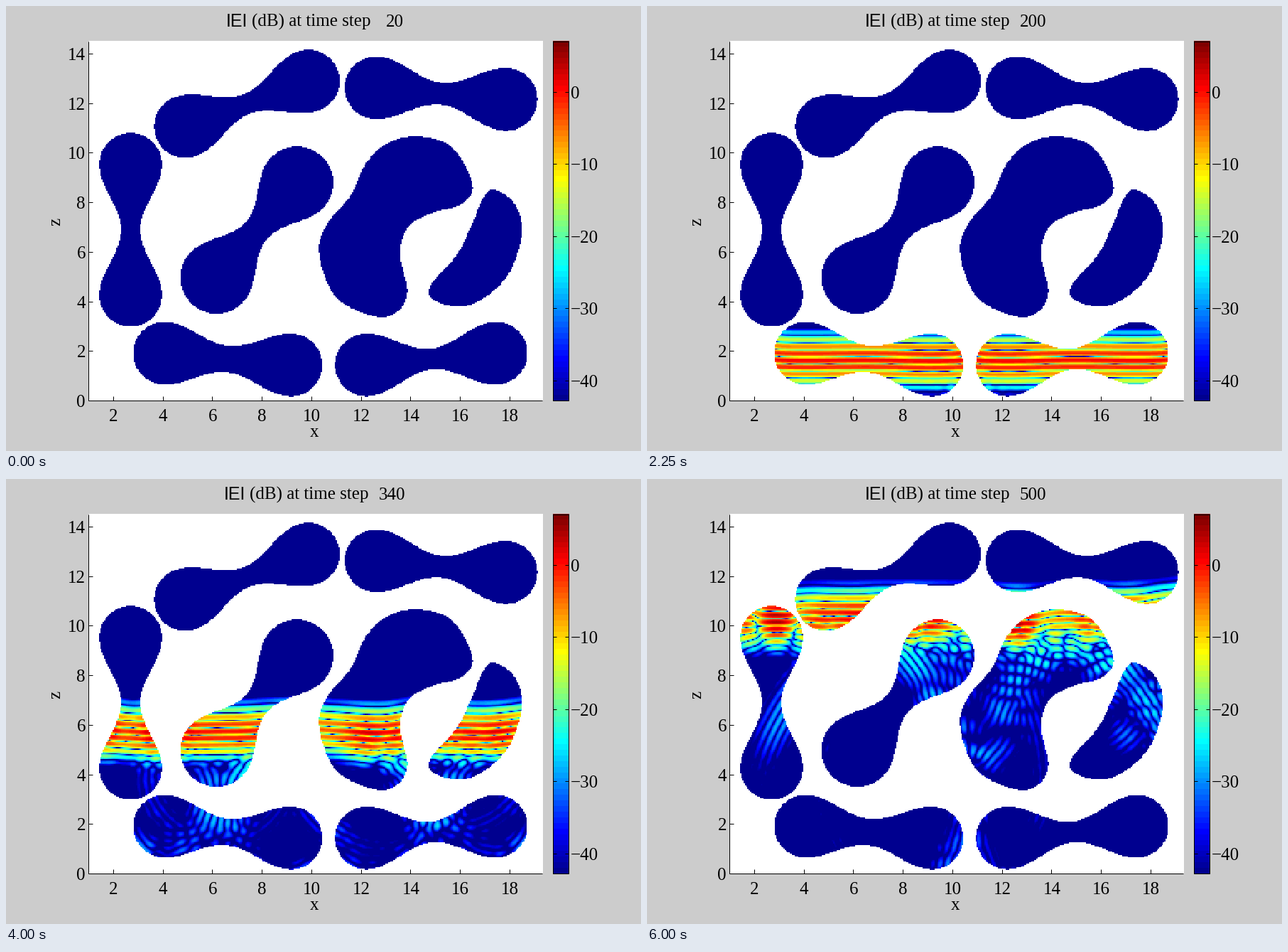
These frames come from a looping animation (894x626 px, 6250 ms). A matplotlib script:

```python
import numpy as np
import matplotlib.pyplot as plt
from matplotlib.animation import FuncAnimation
from matplotlib.colors import ListedColormap
from matplotlib.path import Path

W, H, DPI = 894, 626, 100
LEFT, RIGHT, TOP, BOTTOM = 116.6, 754.8, 49.5, 555
UNIT = 34.87                      # pixels per data unit
NX, NY = 366, 290                 # cells of 0.05 data units
CELL = (RIGHT - LEFT) / NX
DB_MIN, DB_MAX = -42.8, 7.1
FRAMES, STRIDE = 25, 20           # time steps per frame

# Wave model, in cells and time steps
COURANT = 0.608
EPS = 1.08                        # permittivity inside the bodies
WAVE_K = 2 * np.pi / 11.8
PULSE = 13.3                      # envelope length
PAD_SIDE, PAD_BELOW = 100, 160

X, Y = np.meshgrid(LEFT + (np.arange(NX) + .5) * CELL,
                   TOP + (np.arange(NY) + .5) * (BOTTOM - TOP) / NY)


def jet64():
    v = np.arange(1, 65)
    ramp = lambda lo, hi: np.clip(np.minimum(v - lo, hi - v) / 16, 0, 1)
    return ListedColormap(np.c_[ramp(24, 72), ramp(8, 56), ramp(-8, 40)])


def dumbbell(x1, y1, x2, y2, neck, r=44):
    """Two discs joined by a smooth neck of the given half width."""
    half = np.hypot(x2 - x1, y2 - y1) / 2
    ux, uy = (x2 - x1) / (2 * half), (y2 - y1) / (2 * half)
    dx, dy = X - (x1 + x2) / 2, Y - (y1 + y2) / 2
    u, v = np.abs(dx * ux + dy * uy), np.abs(dy * ux - dx * uy)
    width = neck + (r - neck) * np.sin(np.pi * u / (2 * half)) ** 2
    return (u <= half) & (v <= width) | (np.hypot(u - half, v) <= r)


def smooth_blob(*pts):
    """Closed Catmull-Rom outline through a few points."""
    p = np.array(pts, float)
    a, b, c, d = (np.roll(p, k, 0)[:, None] for k in (1, 0, -1, -2))
    t = np.linspace(0, 1, 12, endpoint=False)[None, :, None]
    curve = .5 * (2 * b + (c - a) * t + (2 * a - 5 * b + 4 * c - d) * t**2
                  + (3 * b - a - 3 * c + d) * t**3)
    inside = Path(curve.reshape(-1, 2)).contains_points(np.c_[X.ravel(), Y.ravel()])
    return inside.reshape(X.shape)


bodies = (
    dumbbell(175, 223, 175, 407, 13.5)
    | dumbbell(252, 170, 425, 106, 14.5)
    | dumbbell(520, 115.5, 703, 132, 15.5)
    | dumbbell(409, 249, 296, 382, 19, 51)
    | dumbbell(222.5, 488.5, 400.5, 505, 18.5)
    | dumbbell(506.5, 505, 689, 488.5, 14.5)
    | smooth_blob((578, 184), (627, 199), (656, 252), (640, 279), (600, 291),
                  (566, 310), (554, 348), (564, 402), (550, 430), (519, 437),
                  (464, 410), (440, 348), (452, 306), (485, 266), (505, 223),
                  (535, 194))
    | smooth_blob((687, 259), (715, 279), (725, 322), (703, 382), (655, 420),
                  (607, 417), (596, 395), (633, 351), (655, 308), (671, 270))
)


def incident(step):
    """Upward plane pulse, centred near z = 1.65 at step 200."""
    omega = 2 * np.arcsin(COURANT * np.sin(WAVE_K / 2))
    group = COURANT * np.cos(WAVE_K / 2) / np.cos(omega / 2)
    up = (497.5 - TOP) / CELL - (np.arange(NY + PAD_BELOW) + .5)
    t = step - 200
    row = 1.06 * np.exp(-((up - group * t) / PULSE)**2) * np.cos(WAVE_K * up - omega * t)
    return np.repeat(row[:, None], NX + 2 * PAD_SIDE, axis=1)


def simulate():
    """Finite-difference wave through the bodies; one dB map per frame."""
    eps = np.pad(np.where(bodies, EPS, 1.0), ((0, PAD_BELOW), (PAD_SIDE, PAD_SIDE)),
                 constant_values=1.0)
    gain = (COURANT**2 / eps)[1:-1]
    prev, now = incident(-1), incident(0)
    maps = []
    for step in range(1, FRAMES * STRIDE + 1):
        mid = now[1:-1]
        lap = now[2:] + now[:-2] + np.roll(mid, 1, 1) + np.roll(mid, -1, 1) - 4 * mid
        prev[1:-1] = 2 * mid - prev[1:-1] + gain * lap
        prev, now = now, prev
        if step % STRIDE == 0:
            e = np.abs(now[:NY, PAD_SIDE:-PAD_SIDE])
            maps.append(np.where(bodies, 20 * np.log10(e + 1e-9), np.nan))
    return maps


maps = simulate()

fig = plt.figure(figsize=(W / DPI, H / DPI), dpi=DPI, facecolor='#cccccc')
ax = fig.add_axes([0, 0, 1, 1])
ax.axis('off')

cmap = jet64()
cmap.set_bad('white')
opts = dict(cmap=cmap, vmin=DB_MIN, vmax=DB_MAX, interpolation='nearest', aspect='auto')
im = ax.imshow(maps[0], extent=(LEFT, RIGHT, BOTTOM, TOP), **opts)
ax.imshow(np.linspace(DB_MAX, DB_MIN, 64)[:, None], extent=(770, 793, BOTTOM, TOP), **opts)
ax.set_xlim(0, W)
ax.set_ylim(H, 0)


def line(xs, ys):
    ax.plot(xs, ys, color='black', lw=.72, solid_capstyle='butt')


def text(x, y, s, ha='left', font='Liberation Serif', **kw):
    return ax.text(x, y, s, ha=ha, va=kw.pop('va', 'baseline'), family=font,
                   fontsize=18, color='black', **kw)


line([116, 116], [TOP, 555])
line([116, RIGHT], [555, 555])
for n in range(2, 19, 2):
    px = 151 + (n - 2) * UNIT
    line([px, px], [549, 555])
    text(px + .5, 584, str(n), 'center')
for n in range(0, 15, 2):
    py = 555 - n * UNIT
    line([116, 122], [py, py])
    text(112, py + 9, str(n), 'right')

line([770, 792, 792, 770, 770], [TOP, TOP, 555, 555, TOP])
for db in range(0, -41, -10):
    py = 121 - db * 10.14
    line([770, 775], [py, py])
    line([787, 792], [py, py])
    text(794.5, py + 9, str(db).replace('-', '\u2212'))

text(434, 606, 'x', 'center')
text(70.5, 303, 'z', 'center', va='center', rotation=90)
norm = text(310, 29, 'IEI', font='Liberation Sans')
label = text(346, 29, '(dB) at time step')
count = text(560, 29, '20', 'right')


def update(i):
    step = STRIDE * (i + 1)
    shift = 3 * (step >= 100)     # the centred title widens with its third digit
    norm.set_x(310 - shift)
    label.set_x(346 - shift)
    count.set_x(560 + shift * 2 / 3)
    count.set_text(str(step))
    im.set_data(maps[i])
    return im, norm, label, count


anim = FuncAnimation(fig, update, frames=FRAMES, interval=250, repeat=True,
                     repeat_delay=0, blit=False)
plt.show()
```
